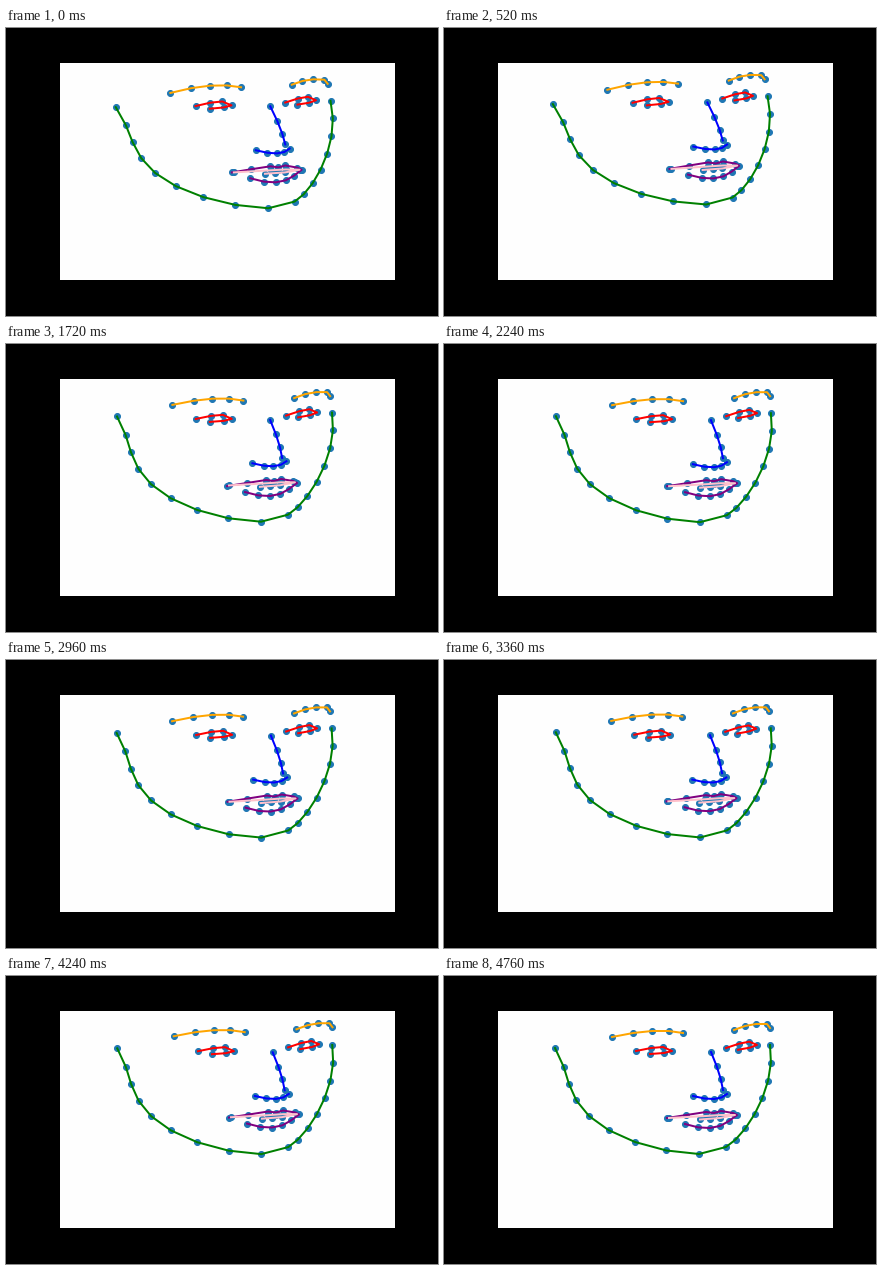
These frames come from a looping animation (432 px wide and 288 px high, 4.8 s). A matplotlib script:

```python
import numpy as np
import matplotlib.pyplot as plt
from matplotlib.animation import FuncAnimation

W, H, DPI = 432, 288, 72
FRAMES, INTERVAL = 120, 40
LEFT, TOP, RIGHT, BOTTOM = 54, 35, 389, 252


def curve(n, *keys):
    """n points on the polynomial through evenly spaced key points."""
    keys = np.array(keys, float)
    u = np.linspace(0, 1, len(keys))
    fit = np.polyfit(u, keys, len(keys) - 1)
    t = np.linspace(0, 1, n)[:, None]
    return sum(c * t ** k for k, c in enumerate(fit[::-1]))


def eye(x, y, width, tilt):
    lid = np.array([(0, 0), (15, -3), (27, -4), (36, 0), (28, 2), (14, 3)])
    dx = lid[:, 0] * width
    return np.column_stack([x + dx, y + lid[:, 1] + dx * tilt])


jaw = np.vstack([
    curve(9, (111, 72), (125, 108), (145, 140), (191, 166), (255, 178)),
    curve(8, (282, 171), (304.5, 148), (322.5, 110.5), (326, 69))])
outer_lip = np.vstack([
    curve(3, (223, 142), (262, 136)),
    [(270, 137), (277, 135), (289, 137), (293, 139)],
    curve(5, (285, 145), (266, 152), (241, 148))])
inner_lip = np.vstack([
    [(225, 142)], curve(3, (262, 140), (277, 139)),
    [(291, 139)], curve(3, (276, 142), (256, 143.5))])

# colour, depth in front of the jaw, resting points
PARTS = [
    ("green", 0, jaw),
    ("orange", 1, curve(5, (168, 61), (208, 55), (239, 57))),
    ("orange", 1, curve(5, (290, 54), (301, 50), (312, 48),
                        (323, 48), (326, 52))),
    ("blue", 1.2, curve(4, (267, 76), (275, 97), (279, 114))),
    ("blue", 1.2, curve(5, (249, 120), (270, 123), (283, 118))),
    ("red", 1, eye(192, 75, 1, 0)),
    ("red", 1, eye(282, 72, 0.86, -0.1)),
    ("purple", 1, outer_lip),
    ("pink", 1, inner_lip),
]

# head poses: frame, shift x, shift y, yaw, lean, nod, roll
POSES = np.array([
    (0, 1, 2.3, -1.5, 4, 2.6, -0.7),
    (13, 0.3, -1.3, -1.5, 4.4, 2.3, -1.5),
    (29, -0.5, -0.6, -3.3, 0, 0.5, -0.6),
    (56, 0.9, 0.2, -0.8, 0, 0, 0),
    (74, -0.2, -0.3, -1.5, 0.3, 0.3, -0.6),
    (94, 0.8, -0.6, -0.5, 0, 0, -0.3),
    (119, 0, 0, 0, 0, 0, 0),
])

frames = np.arange(FRAMES)
motion = np.array([np.interp(frames, POSES[:, 0], column)
                   for column in POSES[:, 1:].T])
phase = np.interp(frames, POSES[:, 0], np.arange(len(POSES)))
unrest = 0.35 * np.abs(np.sin(np.pi * phase))[:, None, None]
rng = np.random.default_rng(4)


def track(points, depth):
    """Positions of a part in every frame: head pose plus a slight tremble."""
    x, y = points.T
    side, drop = (x - 235) / 100, (y - 100) / 50
    shift_x, shift_y, yaw, lean, nod, roll = motion[:, :, None]
    moved = np.stack([x + shift_x + yaw * depth + lean * drop,
                      y + shift_y + nod * side ** 2 + roll * side], axis=2)
    return moved + unrest * rng.normal(size=(FRAMES, 1, 2))


tracks = [track(points, depth) for _, depth, points in PARTS]
dots = np.concatenate(tracks, axis=1)

fig = plt.figure(figsize=(W / DPI, H / DPI), dpi=DPI, facecolor="black")
ax = fig.add_axes([LEFT / W, 1 - BOTTOM / H,
                   (RIGHT - LEFT) / W, (BOTTOM - TOP) / H],
                  facecolor="#fefefe")
ax.set(xlim=(LEFT, RIGHT), ylim=(BOTTOM, TOP), xticks=[], yticks=[])
ax.spines[:].set_visible(False)

scatter = ax.scatter(*dots[0].T, color="#1f77b4")
lines = [ax.plot([], [], color=color, lw=2)[0] for color, _, _ in PARTS]


def update(i):
    scatter.set_offsets(dots[i])
    for line, path in zip(lines, tracks):
        line.set_data(*path[i].T)
    return [scatter, *lines]


anim = FuncAnimation(fig, update, frames=FRAMES, interval=INTERVAL,
                     repeat=True, repeat_delay=0)
plt.show()
```
